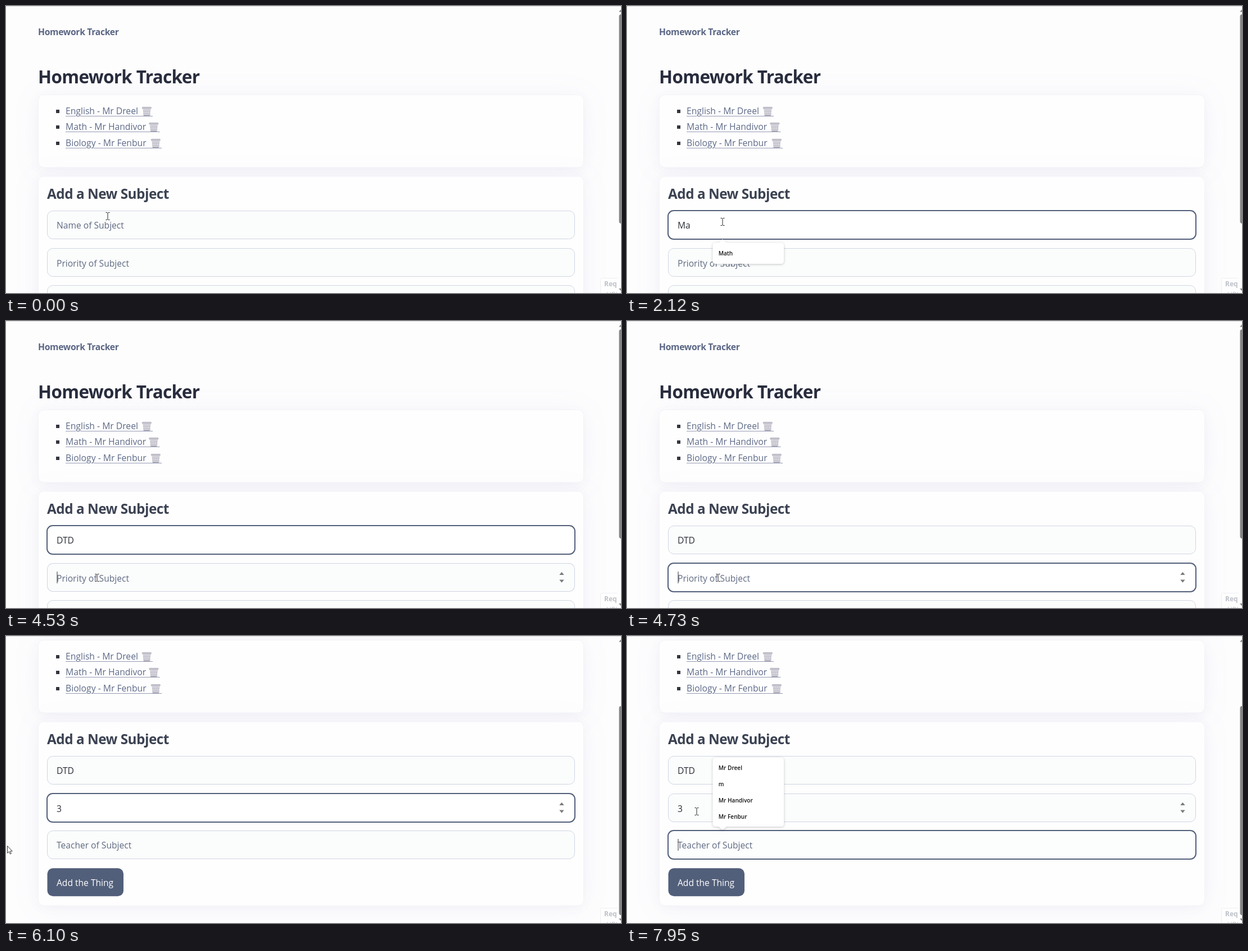
An HTML page for the animation above (8 s loop, 1094x512 px).

```html
<!DOCTYPE html>
<html lang="en">
<head>
<meta charset="utf-8">
<title>Homework Tracker</title>
<style>
  html, body { margin: 0; width: 100%; height: 100%; overflow: hidden; background: #fdfdfe; }
  svg { display: block; width: 1094px; height: 512px; }
  text { font: 15.6px "Open Sans", "Noto Sans", sans-serif; fill: #5b6680; }
  .bold { font-weight: 700; letter-spacing: -.02em; }
  .link { font-size: 15.7px; fill: #5c6886; stroke: #fff; stroke-width: 2px; paint-order: stroke; }
  .option { font-size: 10.1px; font-weight: 600; fill: #111; }
  .card { fill: #fefefe; stroke: #f3f4f9; filter: drop-shadow(0 4px 7px #5a64a00a) drop-shadow(0 3px 24px #5a64a00e); }
  .popup path { fill: #fff; filter: drop-shadow(0 1px 2px #00000038); }
</style>
</head>
<body>
<svg id="stage" viewBox="0 0 1094 512" xmlns="http://www.w3.org/2000/svg"></svg>
<script>
const LOOP = 8000, SCROLL = 151;
const FIELDS = [
  { y: 365.5, baseline: 397, hint: 'Name of Subject' },
  { y: 432.5, baseline: 464.6, hint: 'Priority of Subject' },
  { y: 498.5, baseline: 530, hint: 'Teacher of Subject' }
];
const SUBJECTS = [
  { label: 'English - Mr Dreel', end: 261 },
  { label: 'Math - Mr Handivor', end: 273.5 },
  { label: 'Biology - Mr Fenbur', end: 277 }
];
const FIELD_H = 50;

const text = (x, y, value, attrs = '') => `<text x="${x}" y="${y}" ${attrs}>${value}</text>`;
const card = (y, h) => `<rect class="card" x="57.5" y="${y}" width="970" height="${h}" rx="10"/>`;

function bin(x, y) {
  let mesh = '';
  for (let i = 0; i < 4; i++) {
    const a = 2.5 + i * 3.3;
    mesh += `M${a} 4L${a + 2.6} 15M${a + 2.6} 4L${a} 15`;
  }
  return `<g transform="translate(${x} ${y})">
    <path d="M1 2H16L14 15.5H3Z" fill="#e3e2e8"/>
    <path d="${mesh}M2 8H15M2.6 12H14.4" fill="none" stroke="#b3b0bd" stroke-width=".6"/>
    <path d="M3 15.3H14" stroke="#9c99a8" stroke-width="1.2"/>
    <rect x=".3" y=".3" width="16.4" height="2.8" rx="1.2" fill="#c3c1cc" stroke="#aaa8b5" stroke-width=".6"/></g>`;
}

function subjectRow({ label, end }, i) {
  const y = Math.round(193.2 + i * 28.2);
  return `<rect x="89" y="${y - 8}" width="6" height="6" fill="#33363f"/>
    <path d="M106 ${y + 3.5}H${end}" stroke="#949bb2"/>
    ${text(106, y, label, 'class="link"')}${bin(end - 19.2, y - 13)}`;
}

function field({ y, baseline }, i) {
  const s = y + 25;
  return `<rect id="box${i}" rx="10"/>
    <text id="value${i}" x="90" y="${baseline}"></text>
    <path id="caret${i}" d="M91 ${y + 14.5}v21" stroke="#333"/>
    ${i === 1 ? `<path id="spinner" d="M984.3 ${s - 4.5}l4.2 -5.2l4.2 5.2zM984.3 ${s + 4}h8.4l-4.2 5.2z" fill="#7b7b7b"/>` : ''}`;
}

// A suggestion bubble whose tail points down (above a field) or up (below one).
function popup(id, y, options, tailDown) {
  const h = 36 + 29 * (options.length - 1) + (tailDown ? 0 : 1.5), b = y + h;
  const top = tailDown ? 'H274' : 'H163l7 -6.5l7 6.5H274';
  const bottom = tailDown ? 'H177l-7 6l-7 -6H157.5' : 'H157.5';
  return `<g id="${id}" class="popup">
    <path d="M157.5 ${y}${top}q5 0 5 5V${b - 5}q0 5 -5 5${bottom}q-5 0 -5 -5V${y + 5}q0 -5 5 -5z"/>
    ${options.map((o, i) => text(162.7, y + 22 + i * 29, o, 'class="option"')).join('')}</g>`;
}

document.getElementById('stage').innerHTML = `
  <rect width="1094" height="512" fill="#fdfdfe"/>
  <g id="page">
    ${text(57, 52, 'Homework Tracker', 'class="bold" style="font-size:15.7px;fill:#5a6684"')}
    ${text(57, 138, 'Homework Tracker', 'class="bold" style="font-size:31.4px;fill:#292d3d"')}
    ${card(158.5, 129.5)}${card(304, 328)}
    ${SUBJECTS.map(subjectRow).join('')}
    ${text(73, 344, 'Add a New Subject', 'class="bold" style="font-size:24.3px;fill:#3b4252"')}
    ${FIELDS.map(field).join('')}
    <rect x="73.5" y="565.2" width="135.5" height="50" rx="10" fill="#525f7a"/>
    ${text(90, 597, 'Add the Thing', 'style="fill:#fff"')}
    ${popup('subjects', 264, ['English', 'Math', 'Biology'], true)}
    ${popup('match', 422.5, ['Math'], false)}
    ${popup('teachers', 217 + SCROLL, ['Mr Dreel', 'm', 'Mr Handivor', 'Mr Fenbur'], true)}
  </g>
  <path d="M0 .5H1094" stroke="#dcdcde"/>
  <svg x="1057" y="485" width="30.5" height="27">
    <rect x=".5" y=".5" width="50" height="60" rx="2" fill="#fefefe" stroke="#eeeff2"/>
    ${text(7, 15, 'Req', 'style="font-size:12px;font-weight:700;fill:#bec1c8"')}
    ${text(11, 33.5, 'URL', 'style="font-size:12px;fill:#c6c8ce"')}
  </svg>
  <path d="M1090 10.5l5.5 -6l5.5 6zM1090 504h11l-5.5 6z" fill="#858585"/>
  <rect id="thumb" x="1090.5" width="10" height="373" rx="4" fill="#858585"/>
  <g id="ibeam" fill="none">
    <path d="M-3.5 -6.5H-1L0 -5.5L1 -6.5H3.5M-3.5 6.5H-1L0 5.5L1 6.5H3.5M0 -5.5V5.5" stroke="#fff" stroke-width="2.4"/>
    <path d="M-3.5 -6.5H-1L0 -5.5L1 -6.5H3.5M-3.5 6.5H-1L0 5.5L1 6.5H3.5M0 -5.5V5.5" stroke="#222"/>
  </g>
  <path id="arrow" d="M.5 .5V13.2L3.4 10.6L5.3 15L7.3 14.1L5.4 9.9H9.2Z" fill="#fff" stroke="#222" stroke-width=".9"/>`;

const el = {};
document.querySelectorAll('[id]').forEach(n => el[n.id] = n);

const ramp = (t, a, b) => Math.min(1, Math.max(0, (t - a) / (b - a)));
const within = (t, a, b) => t >= a && t < b;
const mix = (a, b, k) => `rgb(${a.map((v, i) => Math.round(v + (b[i] - v) * k))})`;
const show = (node, on) => node.setAttribute('visibility', on ? 'visible' : 'hidden');
const latest = (steps, t) => steps.reduce((v, s) => t >= s[0] ? s[1] : v, '');
const set = (node, attrs) => Object.entries(attrs).forEach(([name, v]) => node.setAttribute(name, v));

const TYPING = [
  [[1190, 'M'], [1450, 'Ma'], [1580, 'Mat'], [2120, 'Ma'], [2250, 'M'], [2320, ''],
   [3110, 'D'], [3310, 'DT'], [3450, 'DTD']],
  [[5140, '3']],
  []
];
const CARETS = [[[240, 730]], [[4530, 4990]], [[6850, 7400], [7900, LOOP]]];
const POINTER = [
  [0, 181, 375], [70, 181, 375], [280, 170, 385], [3980, 170, 385], [4450, 162, 458],
  [5410, 162, 458], [5760, 2, 374], [6230, 2, 374], [6780, 120, 355],
  [7280, 120, 355], [7800, 124, 313], [LOOP, 124, 313]
];

function pointerAt(t) {
  const i = POINTER.findIndex(p => p[0] > t);
  const [t0, x0, y0] = POINTER[i - 1], [t1, x1, y1] = POINTER[i];
  const k = ramp(t, t0, t1), e = k * k * (3 - 2 * k);
  return [x0 + (x1 - x0) * e, y0 + (y1 - y0) * e];
}

function update(t) {
  const scroll = t < 6040 ? 0 : t < 6100 ? 85 : SCROLL;
  el.page.setAttribute('transform', `translate(0 ${-scroll})`);
  el.thumb.setAttribute('y', 15 + 110 * scroll / SCROLL);

  const [x, y] = pointerAt(t);
  const hovered = FIELDS.findIndex(f => within(x, 73, 1012) && within(y + scroll, f.y, f.y + FIELD_H));
  const first = ramp(t, 240, 450), second = ramp(t, 4530, 4730), third = ramp(t, 6870, 7080);
  const focus = [first - second, second - third, third];

  FIELDS.forEach((f, i) => {
    const k = focus[i], value = latest(TYPING[i], t);
    const white = i === 2 ? k * (1 - .8 * ramp(t, 7450, 7650)) : k;
    // The focus ring grows outwards from the one-pixel border.
    set(el['box' + i], {
      x: 73.5 - k / 2, y: f.y - k / 2, width: 938 + k, height: FIELD_H + k,
      stroke: mix([207, 213, 227], [82, 95, 122], k), 'stroke-width': 1 + k,
      fill: mix([251, 252, 252], [255, 255, 255], white)
    });
    el['value' + i].textContent = value || f.hint;
    el['value' + i].style.fill = value ? '#2b2e36' : '#5f6a82';
    show(el['caret' + i], CARETS[i].some(c => within(t, ...c)));
  });
  show(el.spinner, hovered === 1 || within(t, 4530, 6870));

  show(el.subjects, within(t, 300, 1190));
  show(el.match, within(t, 1190, 2580));
  el.match.setAttribute('opacity', 1 - ramp(t, 2380, 2580));
  show(el.teachers, t >= 6900);

  for (const shape of [el.ibeam, el.arrow])
    shape.setAttribute('transform', `translate(${Math.round(x)} ${Math.round(y)})`);
  show(el.ibeam, hovered >= 0);
  show(el.arrow, hovered < 0);
}

const start = performance.now();
function tick() {
  update((performance.now() - start) % LOOP);
  requestAnimationFrame(tick);
}
update(0);
requestAnimationFrame(tick);
</script>
</body>
</html>
```
